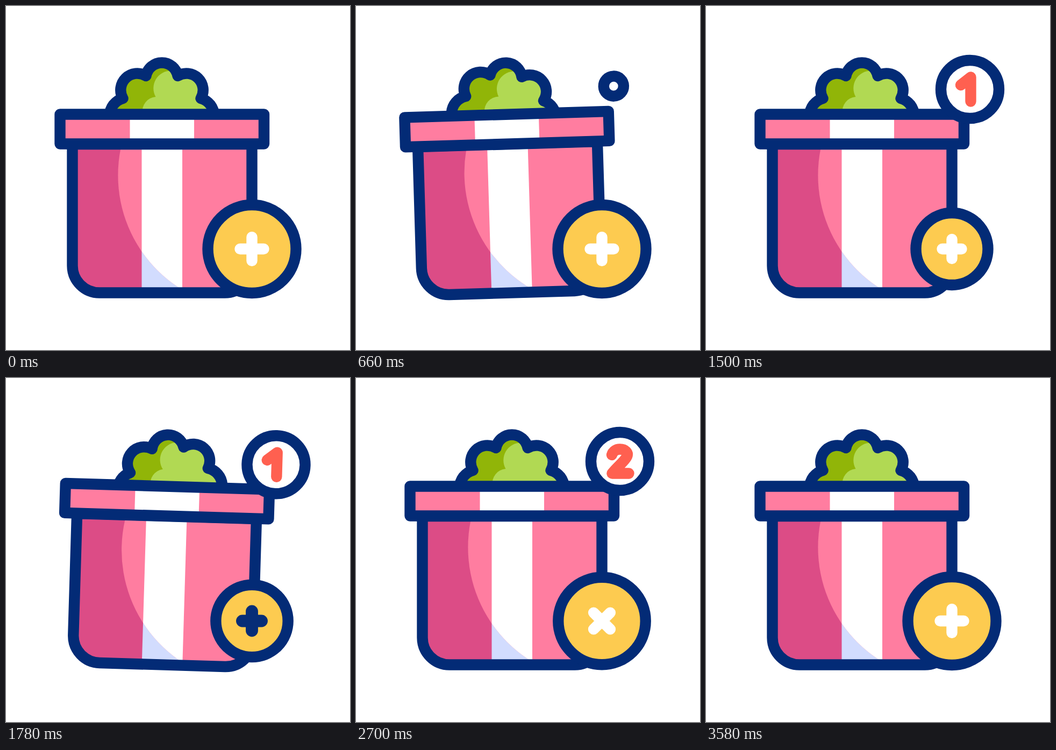
These frames come from a looping animation (640 px wide and 640 px high, 3.6 s). An HTML page:

```html
<!DOCTYPE html>
<html lang="en">
<head>
<meta charset="utf-8">
<title>Add to basket</title>
<style>
  html, body { margin: 0; width: 100%; height: 100%; overflow: hidden; background: #fff; }
  svg { display: block; width: 100vw; height: 100vh; }
  .line { fill: none; stroke: #032b76; stroke-width: 20.4; stroke-linecap: round; stroke-linejoin: round; }
  #badge { fill: none; stroke: #ff6050; stroke-linecap: round; stroke-linejoin: round; }
</style>
</head>
<body>
<svg viewBox="0 0 640 640">
  <defs>
    <path id="leaf" d="M193 225V204A33 33 0 0 1 217.5 172A31 31 0 0 1 260.5 130A30 30 0 0 1 319.5 130A31 31 0 0 1 362.5 172A33 33 0 0 1 387 204V225Z"/>
    <path id="pot" d="M123.5 257V483A50.5 50.5 0 0 0 174 533.5H407A50.5 50.5 0 0 0 457.5 483V257Z"/>
    <clipPath id="leafClip"><use href="#leaf"/></clipPath>
    <clipPath id="potClip"><use href="#pot"/></clipPath>
    <clipPath id="lightClip"><circle cx="458" cy="315" r="249.6"/></clipPath>
  </defs>

  <g id="basket">
    <g id="greens">
      <use href="#leaf" fill="#91b508"/>
      <path clip-path="url(#leafClip)" fill="#b1d953" d="M307 120.5A32.5 32.5 0 0 0 278.5 169A27 27 0 0 0 254 200V230H400V120.5Z"/>
      <use href="#leaf" class="line"/>
    </g>
    <g clip-path="url(#potClip)">
      <path fill="#dc4c86" d="M110 250H470V545H110Z"/>
      <path fill="#d2dcfe" d="M252.5 250H328V545H252.5Z"/>
      <g clip-path="url(#lightClip)">
        <path fill="#ff7da0" d="M110 250H470V545H110Z"/>
        <path fill="#fff" d="M252.5 250H328V545H252.5Z"/>
      </g>
    </g>
    <use href="#pot" class="line"/>
    <path fill="#ff7da0" d="M100.5 201.5H480V256.5H100.5Z"/>
    <path fill="#fff" d="M230.5 201.5H350V256.5H230.5Z"/>
    <path class="line" d="M100.5 201.5H480V256.5H100.5Z"/>
    <g id="badge">
      <circle r="54" fill="#fff" stroke="#032b76"/>
      <path id="one" d="M-17 -8L1.5 -22.5V22.5"/>
      <path id="two" d="M-15 -12C-13 -19 -7 -22.5 0 -22.5C10 -22.5 16 -16 13 -9C9 0 -5 10 -14.5 22.5H16.5"/>
    </g>
  </g>

  <circle id="button" class="line" cx="457.5" cy="452" style="fill:#fdcb50"/>
  <path id="icon" fill="none" stroke-linecap="round"/>
</svg>
<script>
const LOOP = 3600, SECOND = 1320, THIRD = 2660;
const $ = id => document.getElementById(id);
const set = (id, attrs) => {
  for (const name in attrs) $(id).setAttribute(name, attrs[name]);
};
const show = (id, on) => { $(id).style.display = on ? '' : 'none'; };

// Eased rise from 0 to 1 between two times
const ramp = (t, from, to) => {
  const x = Math.min(1, Math.max(0, (t - from) / (to - from)));
  return (1 - Math.cos(Math.PI * x)) / 2;
};

// Rocking from -1 to 1, easing in and out of rest; the last round stops early
function sway(t, last) {
  if (last && t > 600) return ramp(t, 600, 850) - 1;
  if (t < 200 || t > 1000) return 0;
  const c = Math.cos(Math.PI * t / 200);
  return Math.abs(t - 600) > 200 ? (1 + c) / 2 : c;
}

function badgeSize(t, round) {
  if (round === 2) return 1 - ramp(t, 67, 267);
  const rise = round ? 1 + 0.2 * ramp(t, 630, 800) : 1.2 * ramp(t, 583, 800);
  return rise - 0.2 * ramp(t, 800, 1000);
}

function draw(time) {
  const round = (time >= SECOND) + (time >= THIRD);
  const t = time - [0, SECOND, THIRD][round];
  const last = round === 2;

  set('basket', { transform: `rotate(${3 * sway(t, last)} 290 540)` });
  set('greens', { transform: `rotate(${-5 * sway(t - 67, last)} 290 145)` });

  const size = badgeSize(t, round);
  const isTwo = last || (round === 1 && t >= 800);
  show('badge', size > 0.02);
  show('one', size > 0.45 && !isTwo);
  show('two', size > 0.45 && isTwo);
  if (size > 0.02) {
    set('badge', { transform: `translate(491 155) scale(${size})`, 'stroke-width': 20.4 / size });
  }

  const release = ramp(t, 450, 617);
  const r = 82 - 15 * (ramp(t, 17, 183) - release);
  const dark = ramp(t, 183, 300) - release;
  const turn = round === 1 ? ramp(t, 880, 1180) : last ? 1 - ramp(t, 400, 617) : 0;
  const arm = 22 * r / 82;
  const tint = [3, 43, 118].map(c => Math.round(255 + (c - 255) * dark));
  set('button', { r });
  set('icon', {
    d: `M${-arm} 0H${arm}M0 ${-arm}V${arm}`,
    transform: `translate(457.5 452) rotate(${45 * turn})`,
    stroke: `rgb(${tint})`,
    'stroke-width': 20.4 + 2.5 * dark
  });
}

const start = performance.now();
function tick() {
  draw((performance.now() - start) % LOOP);
  requestAnimationFrame(tick);
}
tick();
</script>
</body>
</html>
```
